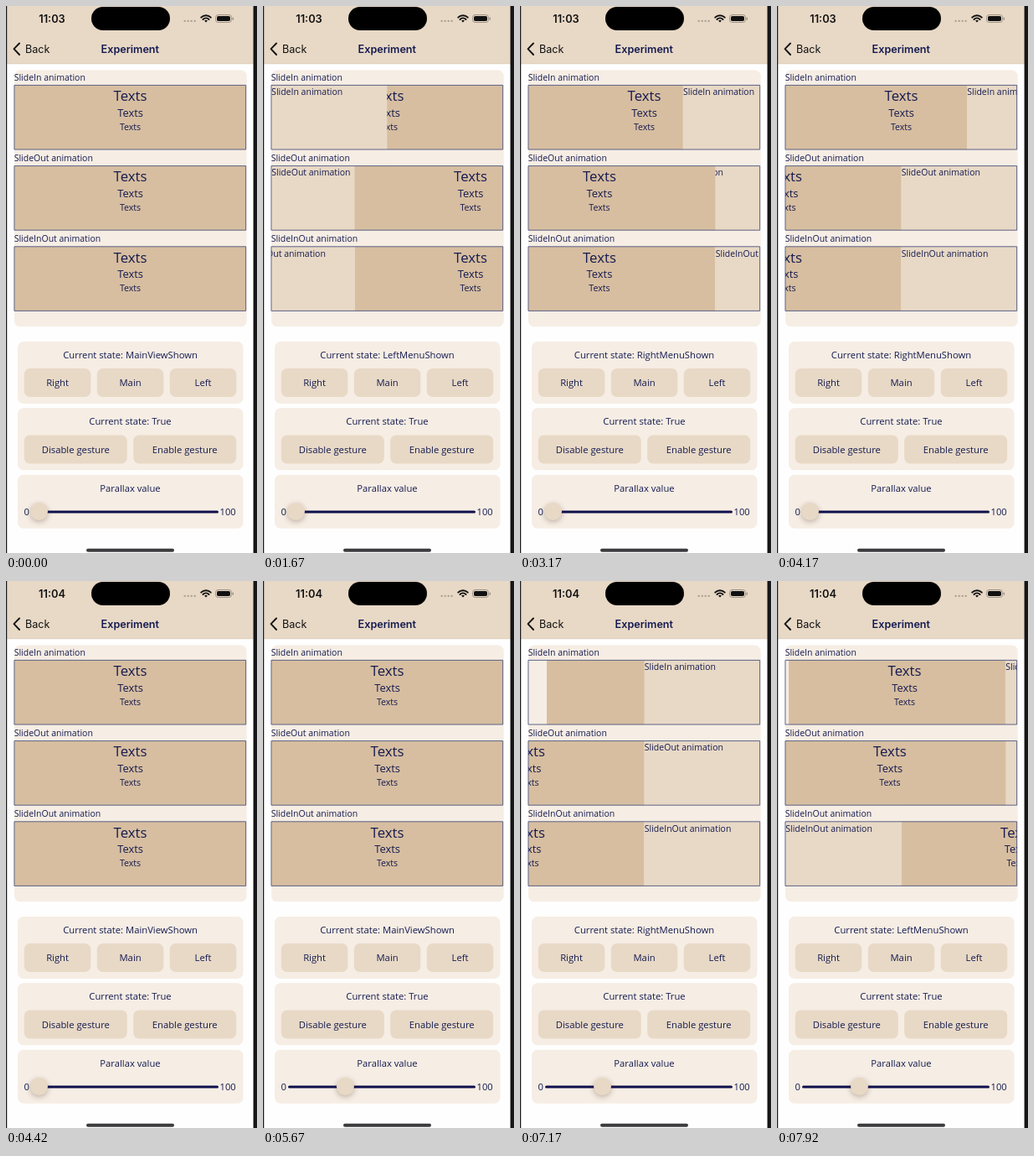
An HTML page with a canvas for the animation above (8000 ms loop, 300 by 652 pixels).

```html
<!DOCTYPE html>
<html lang="en">
<head>
<meta charset="utf-8">
<title>Side menu experiment</title>
<style>
html, body { margin: 0; width: 100%; height: 100%; overflow: hidden; background: #fefefe; }
canvas { display: block; width: 300px; height: 652px; }
</style>
</head>
<body>
<canvas id="stage"></canvas>
<script>
const W = 300, H = 652, LOOP = 8000, FPS = 12;
const NAVY = '#141a50', SAND = '#e8d9c6', TAN = '#d7bea0', CARD = '#f6ede4';
const BODY = '"Open Sans", sans-serif', SYSTEM = 'Inter, sans-serif';

const canvas = document.getElementById('stage');
const ctx = canvas.getContext('2d');
const ratio = window.devicePixelRatio || 1;
canvas.width = W * ratio;
canvas.height = H * ratio;

// Menu opening over time: 1 = left menu shown, -1 = right menu shown
const slideIn = [
  [1420, 0], [1667, 1], [2302, 1], [2552, 0],
  [3000, 0], [3250, -1], [4100, -1], [4167, -0.43], [4278, 0],
  [6670, 0], [6920, -1], [7690, -1], [7917, -0.1], [7942, 0]
];
const slideOut = [
  [1487, 0], [1737, 1], [2450, 1], [2700, 0],
  [3070, 0], [3320, -1], [4170, -1], [4415, 0],
  [6740, 0], [6990, -1], [7690, -1], [7917, -0.097], [7942, 0]
];
const slideInOut = [...slideOut.slice(0, -3), [7570, -1], [7820, 1]];
const parallax = [[6670, 0], [7000, 22], [7690, 22], [7917, 4], [7942, 0]];
const thumb = [[5500, 39.5], [5667, 98.5]];
const states = [
  [0, 'MainViewShown'], [1580, 'LeftMenuShown'], [2415, 'MainViewShown'],
  [3160, 'RightMenuShown'], [4245, 'MainViewShown'],
  [6830, 'RightMenuShown'], [7660, 'LeftMenuShown']
];

function at(keys, t) {
  const next = keys.findIndex(k => k[0] > t);
  if (next === 0) return keys[0][1];
  if (next < 0) return keys[keys.length - 1][1];
  const [t0, a] = keys[next - 1], [t1, b] = keys[next];
  return a + (b - a) * (t - t0) / (t1 - t0);
}

function rect(x, y, w, h, color) {
  ctx.fillStyle = color;
  ctx.fillRect(x, y, w, h);
}

function round(x, y, w, h, r, color) {
  ctx.fillStyle = color;
  ctx.beginPath();
  ctx.roundRect(x, y, w, h, r);
  ctx.fill();
}

function text(str, x, y, size, align = 'center', family = BODY, weight = 400, color = NAVY) {
  ctx.font = `${weight} ${size}px ${family}`;
  ctx.textAlign = align;
  ctx.fillStyle = color;
  ctx.fillText(str, x, y);
}

function button(label, x, y, w) {
  round(x, y, w, 34, 7, SAND);
  text(label, x + w / 2, y + 21.3, 11.25);
}

function drawWifi(x, y) {
  ctx.strokeStyle = '#111';
  ctx.lineWidth = 1.9;
  for (const r of [8.2, 5]) {
    ctx.beginPath();
    ctx.arc(x, y, r, -Math.PI * 0.75, -Math.PI * 0.25);
    ctx.stroke();
  }
  ctx.fillStyle = '#111';
  ctx.beginPath();
  ctx.moveTo(x, y);
  ctx.arc(x, y, 2.7, -Math.PI * 0.75, -Math.PI * 0.25);
  ctx.fill();
}

function drawHeader(t) {
  rect(0, 0, W, 69, SAND);
  rect(0, 68.5, W, 0.7, '#d9ccbb');
  text(t < 4330 ? '11:03' : '11:04', 55, 19.7, 12.8, 'center', SYSTEM, 600, '#111');
  round(102, 1, 94, 28, 14, '#000');
  for (let i = 0; i < 4; i++) round(212.5 + i * 4, 16.7, 2.3, 2.3, 1.1, '#a89d90');
  drawWifi(239, 19.5);
  ctx.strokeStyle = '#958b80';
  ctx.lineWidth = 0.9;
  ctx.beginPath();
  ctx.roundRect(250.5, 10.5, 19, 9, 3);
  ctx.stroke();
  round(252, 12, 16, 6, 1.8, '#111');
  round(270.6, 13.4, 1.3, 3.4, 0.6, '#958b80');

  ctx.strokeStyle = '#111';
  ctx.lineWidth = 1.9;
  ctx.lineCap = ctx.lineJoin = 'round';
  ctx.beginPath();
  ctx.moveTo(16, 44.5);
  ctx.lineTo(9.5, 51.2);
  ctx.lineTo(16, 58);
  ctx.stroke();
  text('Back', 23, 56, 12.6, 'left', SYSTEM, 400, '#111');
  text('Experiment', 148.3, 56, 12.6, 'center', SYSTEM, 600);
}

const LEFT = 10, WIDTH = 277, HALF = WIDTH / 2;

function drawMain(x, y) {
  rect(x, y, WIDTH, 77, TAN);
  const mid = x + HALF;
  text('Texts', mid, y + 18.9, 16.8);
  text('Texts', mid, y + 37.8, 12.9);
  text('Texts', mid, y + 53.4, 10.6);
}

function drawMenu(name, x, y) {
  rect(x, y, HALF, 77, SAND);
  text(name, x + 0.3, y + 11.9, 10.5, 'left');
}

function drawPanel(row, name, open, mode, shift = 0) {
  const y = 94.2 + row * 96.2;
  const title = name + ' animation';
  text(title, LEFT - 0.3, y - 5.6, 10.5, 'left');

  ctx.save();
  ctx.beginPath();
  ctx.rect(LEFT, y, WIDTH, 77);
  ctx.clip();
  const rest = open > 0 ? LEFT : LEFT + HALF;
  const moving = open > 0 ? LEFT + (open - 1) * HALF : LEFT + WIDTH + open * HALF;
  const menu = () => open && drawMenu(title, mode === 'out' ? rest : moving, y);
  if (mode === 'out') menu();
  drawMain(LEFT + (mode === 'in' ? shift : open * HALF), y);
  if (mode !== 'out') menu();
  ctx.restore();

  ctx.strokeStyle = '#4c557f';
  ctx.lineWidth = 0.9;
  ctx.strokeRect(LEFT + 0.3, y + 0.2, WIDTH - 0.6, 76.6);
}

function drawControls(t) {
  const state = states.filter(s => s[0] <= t).pop()[1];
  round(14, 400, 269.5, 74, 7, CARD);
  text('Current state: ' + state, 148.5, 420, 11.25);
  ['Right', 'Main', 'Left'].forEach((label, i) => button(label, 21.8 + i * 87, 432, 79.5));

  round(14, 479.3, 269.5, 74, 7, CARD);
  text('Current state: True', 148.5, 499.4, 11.25);
  button('Disable gesture', 21.8, 511.5, 123);
  button('Enable gesture', 152.2, 511.5, 123);

  round(14, 558.8, 269.5, 64, 7, CARD);
  text('Parallax value', 148.5, 579, 11.25);
  text('0', 21.5, 607.3, 11.25, 'left');
  text('100', 255.5, 607.3, 11.25, 'left');
  round(30, 601.5, 224, 3, 1.5, '#10104e');

  const x = at(thumb, t);
  ctx.save();
  ctx.shadowColor = 'rgba(60, 40, 20, 0.3)';
  ctx.shadowBlur = 6 * ratio;
  ctx.shadowOffsetY = 2 * ratio;
  round(x - 10.5, 592, 21, 21, 10.5, SAND);
  ctx.restore();
}

function draw(now) {
  // The screen refreshes in steps of a twelfth of a second
  const t = Math.floor((now % LOOP) * FPS / 1000 + 0.06) * 1000 / FPS % LOOP;
  ctx.setTransform(ratio, 0, 0, ratio, 0, 0);
  rect(0, 0, W, H, '#fefefe');
  drawHeader(t);
  round(10, 76.5, 277.7, 305.8, 7, CARD);
  drawPanel(0, 'SlideIn', at(slideIn, t), 'in', at(parallax, t));
  drawPanel(1, 'SlideOut', at(slideOut, t), 'out');
  drawPanel(2, 'SlideInOut', at(slideInOut, t), 'both');
  drawControls(t);
  round(96, 646.7, 105, 4, 2, '#3c3c3e');
  rect(0, 0, 1.2, H, '#1a1a1c');
  rect(295.6, 0, 4.4, H, '#161618');
}

const start = performance.now();
function loop() {
  draw(performance.now() - start);
  requestAnimationFrame(loop);
}
loop();
</script>
</body>
</html>
```
